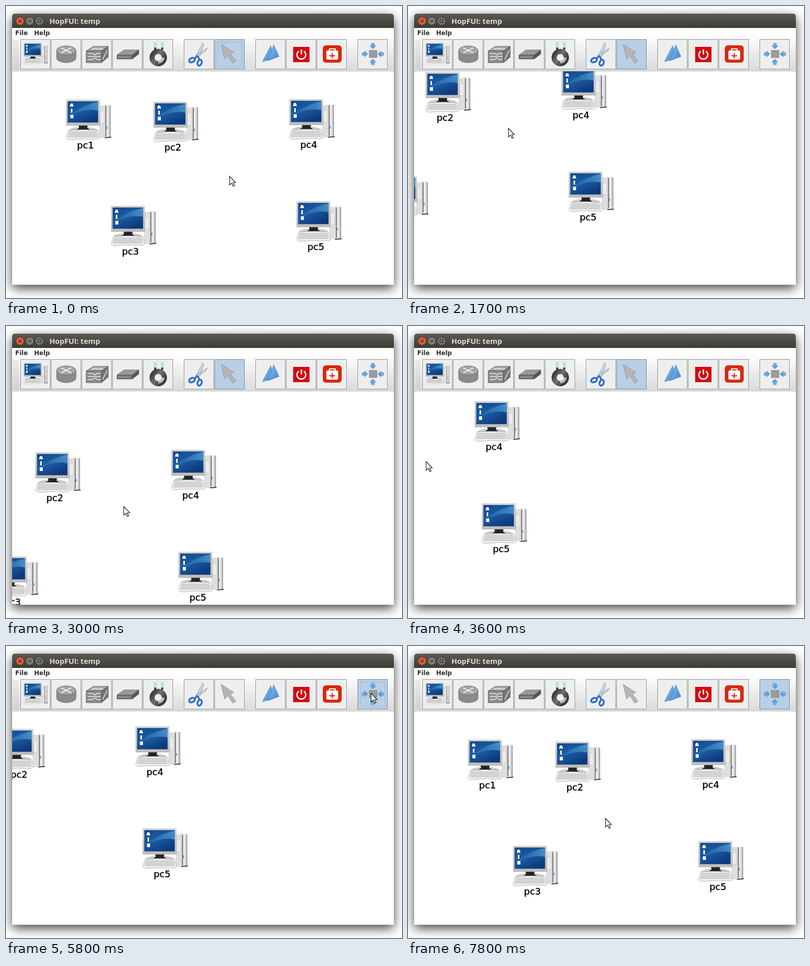
Recreate the animation shown at these times as an HTML page. Size 775x572 px, loop 8000 ms.

```html
<!DOCTYPE html>
<html lang="en">
<head>
<meta charset="utf-8">
<title>Network editor</title>
<style>
  html, body { margin: 0; width: 100%; height: 100%; overflow: hidden; background: #fff; }
  #shadow { position: absolute; left: 12px; top: 15px; width: 747px; height: 531px;
    border-radius: 6px 6px 0 0; box-shadow: 0 7px 21px rgba(0,0,0,.74); }
  svg { position: absolute; left: 0; top: 0; }
  .title { font: bold 14.5px "Open Sans", sans-serif; fill: #dfdbd2; }
  .menu { font: bold 12px "DejaVu Sans", sans-serif; fill: #2b2b2b; }
  .label { font: 18px "DejaVu Sans", sans-serif; text-anchor: middle; stroke: #000; stroke-width: .4; }
  .button { fill: #eee; stroke: #8f979e; }
  .button.on { fill: #b8cfe5; stroke: #7a8a99; }
  .button.down { stroke: #5c7591; stroke-width: 2; }
  .focus { fill: none; stroke: #9fb9d6; }
</style>
</head>
<body>
<div id="shadow"></div>
<svg width="775" height="572" viewBox="0 0 775 572">
  <defs>
    <linearGradient id="titleBar" x2="0" y2="1"><stop stop-color="#5c5b52"/><stop offset="1" stop-color="#3c3b37"/></linearGradient>
    <linearGradient id="toolBar" x2="0" y2="1"><stop offset=".15" stop-color="#fff"/><stop offset="1" stop-color="#d9d9d9"/></linearGradient>
    <linearGradient id="screen" x2=".6" y2="1"><stop stop-color="#12498f"/><stop offset=".5" stop-color="#1c5ba3"/><stop offset="1" stop-color="#0d3a7e"/></linearGradient>
    <linearGradient id="glow" x2="1"><stop stop-color="#2f86c0" stop-opacity=".2"/><stop offset="1" stop-color="#62b4dc" stop-opacity=".6"/></linearGradient>
    <linearGradient id="silver" x2="0" y2="1"><stop stop-color="#dcdcdc"/><stop offset="1" stop-color="#bdbdbd"/></linearGradient>
    <linearGradient id="front" x2="1"><stop stop-color="#cfcfcf"/><stop offset=".55" stop-color="#f0f0f0"/><stop offset="1" stop-color="#999"/></linearGradient>
    <linearGradient id="blue" x2="1" y2="1"><stop stop-color="#8cc4f4"/><stop offset="1" stop-color="#3a83cc"/></linearGradient>
    <linearGradient id="coil" x2="1" y2=".7"><stop stop-color="#303438"/><stop offset=".5" stop-color="#6d7276"/><stop offset="1" stop-color="#35393c"/></linearGradient>
    <pattern id="grip" x="15" y="67" width="4" height="4" patternUnits="userSpaceOnUse">
      <path d="M0 0h1v1h-1zM2 2h1v1h-1z" fill="#888"/>
    </pattern>
    <clipPath id="canvas"><path d="M12 128h747v418H12z"/></clipPath>

    <g id="pc">
      <ellipse cx="33" cy="60" rx="28" ry="6" fill="#c9c9c9"/>
      <path d="M64 12h11v63H64z" fill="#dedede"/>
      <path d="M66 23h8v23h-8z" fill="#ececec" stroke="#c4c4c4" stroke-width=".6"/>
      <path d="M75 10l12 2v62l-12 2z" fill="url(#front)"/>
      <path d="M77.500 13v59" stroke="#4a4a4a" stroke-width="1.300"/>
      <path d="M75 75l13-1" stroke="#444" stroke-width="2"/>
      <path d="M79.500 53v5" stroke="#3384dd" stroke-width="1.600"/>
      <path d="M24 50h18l-1 6 5 3H20l5-3z" fill="#20242a"/>
      <path d="M0 1h65l1 50H0z" fill="url(#silver)" stroke="#b0b0b0" stroke-width=".7"/>
      <path d="M3 4h59v41H3z" fill="url(#screen)" stroke="#194171" stroke-width=".7"/>
      <path d="M3 36Q24 13 62 5V22Q32 16 3 36z" fill="url(#glow)"/>
      <path d="M8 8h5v3h1v3H7v-3h1zM9 18h3v8H9zM8 30h6v7H8z" fill="#f4faff"/>
      <path d="M4 61Q33 58 62 61L66 74Q65 79 59 78Q33 76 7 79Q0 79 0 74z" fill="#eee" stroke="#aaa" stroke-width=".8"/>
      <path d="M6 64H60M5 67H61M4 70H62M4 73H62" stroke="#777" stroke-width="1.200" stroke-dasharray="2 1"/>
    </g>
    <path id="arrow" d="M-3-10.500h6v5h3l-6 6-6-6h3z" fill="url(#blue)" stroke="#5a99d2" stroke-width=".8"/>
  </defs>

  <path d="M12 43V21q0-6 6-6H753q6 0 6 6V43z" fill="url(#titleBar)"/>
  <g stroke="#33322e" fill="#7c7a71">
    <circle cx="27.500" cy="29.500" r="8" fill="#ea5b37"/>
    <circle cx="46.500" cy="29.500" r="8"/><circle cx="65.500" cy="29.500" r="8"/>
    <path d="M24.500 26.500l6 6m0-6l-6 6M43 29.500h7M62.500 26.500h6v6h-6z" fill="none" stroke-width="1.400"/>
  </g>
  <text class="title" x="85" y="35">HopFUI: temp</text>
  <path d="M12 43h747v503H12z" fill="#fff"/>
  <path d="M12 43h747v85H12z" fill="url(#toolBar)"/>
  <path d="M12 127.500h747" stroke="#c4c4c4"/>
  <text class="menu" x="18" y="57">File</text>
  <text class="menu" x="55" y="57">Help</text>
  <path d="M15 67h10v58H15z" fill="url(#grip)"/>
  <g id="buttons"></g>

  <use href="#pc" transform="translate(35 72) scale(.53)"/>

  <g id="router" stroke="#666" stroke-width=".8">
    <path d="M99 87v15a19 9 0 0 0 38 0V87z" fill="#8b8b8b"/>
    <ellipse cx="118" cy="87" rx="19" ry="9" fill="#a5a5a5"/>
    <path d="M108 82l20 10M128 82l-20 10" stroke="#fff" stroke-width="1.500"/>
  </g>

  <g id="switch" stroke="#4c4c4c" stroke-width=".8">
    <path d="M157 88l14-9h29l-13 9z" fill="#aaa"/>
    <path d="M187 88l13-9v21l-13 11z" fill="#777"/>
    <path d="M157 88h30v23h-30z" fill="#8c8c8c"/>
    <path d="M160 93h10l4 3 4-3h7M160 99h25M160 105h9l5-3 5 3h6M168 84h22M189 105l9-18" stroke="#eee" stroke-width="1.400" fill="none"/>
  </g>

  <g id="hub" stroke="#555" stroke-width=".6">
    <path d="M217 96l14-10h29l-13 10z" fill="#999"/>
    <path d="M247 96l13-10v8l-13 10z" fill="#555"/>
    <path d="M217 96h30v8h-30z" fill="#707070"/>
    <path d="M220 100h24" stroke="#ddd" stroke-width="1.500" stroke-dasharray="2 2"/>
  </g>

  <g id="cable" fill="none">
    <path d="M292 81v8M306 81q0 6-4 9" stroke="#35393c" stroke-width="4"/>
    <circle cx="298" cy="101" r="12" stroke="url(#coil)" stroke-width="10"/>
    <path d="M298 110a10 10 0 0 0 10-9" stroke="#b9bdc0" stroke-width="5"/>
    <path d="M289.500 71h5v10h-5zM303.500 71h5v10h-5z" fill="#e4f5fa" stroke="#a3ccd9"/>
    <path d="M292 73v5M306 73v5" stroke="#58a9c6"/>
  </g>

  <g id="scissors" fill="none" stroke="#2e6cc4" stroke-width="3.500">
    <path d="M385 72l2 5-10 24-5-3zM394 82l-3 6-17 13-3-4z" fill="#cbd7e1" stroke="#8193a3" stroke-width=".8"/>
    <path d="M375 97l-6 6M376 99l2 6"/>
    <ellipse cx="364" cy="106" rx="6" ry="4" transform="rotate(-25 364 106)"/>
    <ellipse cx="379" cy="111" rx="4" ry="6" transform="rotate(20 379 111)"/>
  </g>

  <path id="pointer" d="M421 75l25 16-7 3 11 14-6 4-10-15-6 7z" fill="#b5b5b5" stroke="#999"/>

  <g id="start" fill="url(#blue)" stroke="#3b80c0" stroke-width=".8">
    <path d="M518 78l-16 31 23-7z"/><path d="M524 76l-11 31 21-8z"/>
  </g>

  <path d="M562 80h32v30h-32z" fill="#d50b10"/>
  <path d="M573 88.500a8.600 8.600 0 1 0 10 0M578 85v10" fill="none" stroke="#fff" stroke-width="2.600"/>

  <rect x="620" y="77" width="37" height="34" rx="6" fill="#d92a0c"/>
  <path d="M633 88v-4h11v4" fill="none" stroke="#fff" stroke-width="2.200"/>
  <rect x="627" y="87" width="23" height="18" rx="3" fill="#fff"/>
  <path d="M638.500 92v11M633 97.500h11" stroke="#d91b10" stroke-width="2"/>

  <path d="M711 87h15v14h-15z" fill="#9b9b9b" stroke="#888"/>
  <g id="arrows"></g>

  <g clip-path="url(#canvas)"><g id="world"></g></g>
  <path id="cursor" d="M.5.500V17.500L4.500 14 7.500 20.200 10.200 19 7.200 13H12.300z" fill="#fff" stroke="#1a1a1a" stroke-width="1.200"/>
</svg>

<script>
const LOOP = 8000, SELECT = 6, CENTER = 10;
const byId = id => document.getElementById(id);
const repeat = (n, make) => Array.from({ length: n }, (_, i) => make(i)).join('');

byId('buttons').innerHTML = repeat(11, i => {
  const x = 28 + 60 * i + 20 * ((i > 4) + (i > 6) + (i > 9));
  return `<rect class="button" x="${x + .5}" y="65.5" width="58" height="58"/>
    <rect class="focus" x="${x + 5.5}" y="70.5" width="48" height="48"/>`;
});
const buttons = document.querySelectorAll('.button');
const focusRings = document.querySelectorAll('.focus');

byId('arrows').innerHTML = repeat(4, i =>
  `<use href="#arrow" transform="rotate(${90 * i} 718 94) translate(718 83.500)"/>`);

const computers = [[118, 183], [289, 187], [206, 391], [555, 182], [569, 382]];
byId('world').innerHTML = repeat(computers.length, i =>
  `<g transform="translate(${computers[i]})"><use href="#pc"/><text class="label" x="37.5" y="96">pc${i + 1}</text></g>`);

// Turning points of the dragged view: [time, x, y].
const dragPath = [
  [750, 0, 0], [1700, -254, -58], [1950, -320, -78], [2400, -359, 77],
  [2700, -310, 114], [3050, -232, 50], [3400, -380, -14], [3650, -426, -36]
];

const clamp = u => Math.min(1, Math.max(0, u));
const progress = (t, from, to) => clamp((t - from) / (to - from));
const smooth = u => u * u * (3 - 2 * u);
const easeOut = u => 1 - (1 - u) ** 3;
const mix = (a, b, u) => a + (b - a) * u;

// Smooth curve through the turning points, at rest at both ends.
function drag(t) {
  const last = dragPath.length - 1;
  const next = dragPath.findIndex(k => k[0] > t);
  const i = next < 0 ? last - 1 : Math.max(0, next - 1);
  const a = dragPath[i], b = dragPath[i + 1], span = b[0] - a[0];
  const u = progress(t, a[0], b[0]);
  const slope = (j, c) => {
    if (j === 0 || j === last) return 0;
    const p = dragPath[j - 1], n = dragPath[j + 1];
    return span * (n[c] - p[c]) / (n[0] - p[0]);
  };
  return [1, 2].map(c => mix(a[c], b[c], smooth(u))
    + u * (1 - u) * ((1 - u) * slope(i, c) - u * slope(i + 1, c)));
}

function panAt(t) {
  const left = 1 - smooth(progress(t, 5330, 6640));
  return drag(t).map(v => v * left);
}

function cursorAt(t) {
  if (t < 700) {
    const u = smooth(progress(t, 50, 400));
    return [mix(437, 461, u), mix(333, 301, u)];
  }
  if (t < 3700) {
    const [x, y] = drag(t + 40);   // the view trails the hand a little
    return [x + 461, y + 301];
  }
  if (t < 6500) {
    const u = progress(t, 3700, 4900);
    return [mix(35, 714, easeOut(u)), mix(265, 92, u * u)];
  }
  const u = easeOut(progress(t, 6550, 7500));
  return [mix(714, 386, u), mix(92, 337, u)];
}

// The screen refreshes every 100 ms, less often while the view recentres.
function tick(t) {
  const step = t >= 5600 && t < 6400 ? 200 : 100;
  return Math.floor(t / step) * step;
}

const place = (id, [x, y]) =>
  byId(id).setAttribute('transform', `translate(${Math.round(x)} ${Math.round(y)})`);

function draw() {
  const t = tick(performance.now() % LOOP);
  place('world', panAt(t));
  place('cursor', cursorAt(t));
  buttons[SELECT].classList.toggle('on', t < 5300);
  buttons[CENTER].classList.toggle('on', t >= 5100);
  buttons[CENTER].classList.toggle('down', t >= 5100 && t < 5300);
  focusRings.forEach((ring, i) => {
    const shown = i === SELECT && t < 800 || i === CENTER && t >= 5100 && t < 7800;
    ring.style.display = shown ? '' : 'none';
  });
  requestAnimationFrame(draw);
}
draw();
</script>
</body>
</html>
```
